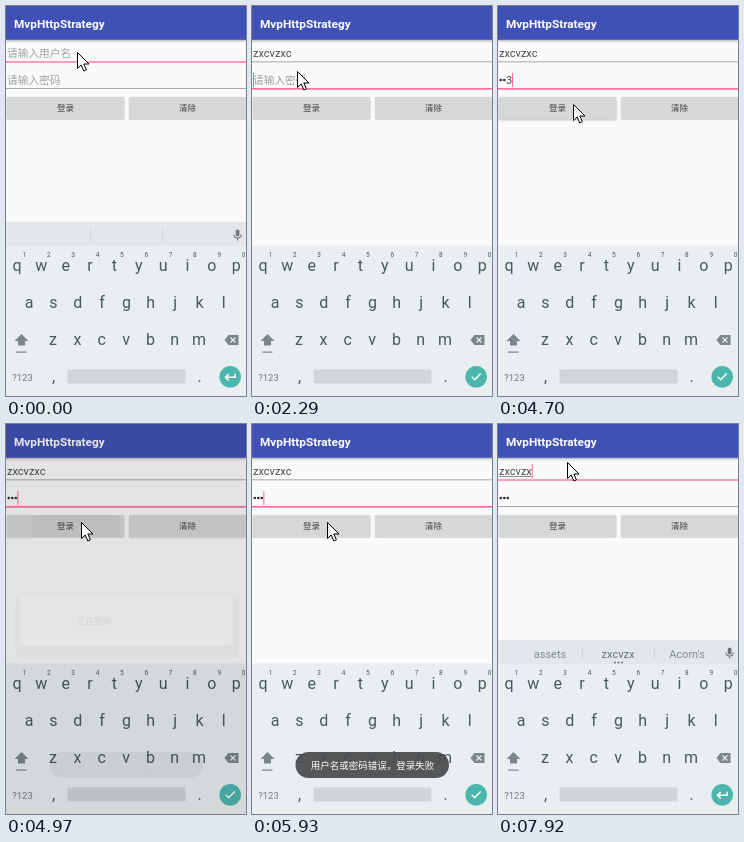
An HTML page with a canvas that plays this animation: 240 px wide and 390 px high, repeating every 8000 ms.

```html
<!DOCTYPE html>
<html lang="zh-CN">
<head>
<meta charset="utf-8">
<title>Login demo</title>
<style>
html, body { margin: 0; width: 100%; height: 100%; overflow: hidden; background: #fafafa; }
canvas { display: block; width: 240px; height: 390px; }
</style>
</head>
<body>
<canvas id="stage"></canvas>
<script>
const canvas = document.getElementById('stage');
const ctx = canvas.getContext('2d');
const ratio = window.devicePixelRatio || 1;
canvas.width = 240 * ratio;
canvas.height = 390 * ratio;

const LOOP = 8000;
const PINK = '#ff4081', TEAL = '#4db6ac', INK = '#475860', GREY = '#727b80';
const FONT = 'Roboto, "Noto Sans CJK SC", "Noto Sans CJK", sans-serif';
const USER = 'zxcvzxc';

const bursts = [
  [0, 0, 1], [310, 1050, 6], [1480, 2290, 7], [2720, 2720, 1], [3150, 3300, 2], [3610, 3610, 1],
  [4040, 4700, 6], [4970, 5500, 5], [5930, 6900, 8], [7050, 7500, 4], [7780, 7920, 2]
];
const ticks = bursts.flatMap(([a, b, n]) =>
  Array.from({ length: n }, (_, i) => n > 1 ? a + (b - a) * i / (n - 1) : a));

const progress = (t, a, b) => Math.min(1, Math.max(0, (t - a) / (b - a)));
const within = (t, a, b) => t >= a && t < b;

function text(s, x, y, size, color, align = 'left', weight = 400) {
  ctx.font = `${weight} ${size}px ${FONT}`;
  ctx.textAlign = align;
  ctx.fillStyle = color;
  ctx.fillText(s, x, y);
}
function rect(x, y, w, h, color, r = 0) {
  ctx.fillStyle = color;
  ctx.beginPath();
  ctx.roundRect(x, y, w, h, r);
  ctx.fill();
}
function circle(x, y, r, color) {
  ctx.fillStyle = color;
  ctx.beginPath();
  ctx.arc(x, y, r, 0, 7);
  ctx.fill();
}
function shape(d, x, y, fill, stroke, width = 1) {
  const path = new Path2D(d);
  ctx.save();
  ctx.translate(x, y);
  if (fill) { ctx.fillStyle = fill; ctx.fill(path); }
  if (stroke) { ctx.strokeStyle = stroke; ctx.lineWidth = width; ctx.stroke(path); }
  ctx.restore();
}
function shadowed(blur, dy, alpha, draw) {
  ctx.save();
  ctx.shadowColor = `rgba(0,0,0,${alpha})`;
  ctx.shadowBlur = blur * ratio;
  ctx.shadowOffsetY = dy * ratio;
  draw();
  ctx.restore();
}

function userLength(t) {
  if (t < 300) return 0;
  if (t < 1040) return 1 + Math.floor((t - 300) / 148);
  return t < 7770 ? 7 : 6;
}
const passLength = t => t < 3140 ? 0 : t < 3290 ? 1 : t < 3600 ? 2 : 3;
const userFocused = t => t < 2010 || t >= 6600;
const caretVisible = t => t >= 300 && ![
  [1470, 2010], [2710, 3140], [4160, 4560], [5490, 5920], [7490, 7770]
].some(([a, b]) => within(t, a, b));

function pointer(t) {
  const moves = [[1350, 2020, 45, 65], [3910, 4570, 75, 98], [5930, 6490, 69, 38]];
  let x = 71, y = 46;
  for (const [a, b, toX, toY] of moves) {
    const p = progress(t, a, b), k = p * p * (3 - 2 * p);
    x += (toX - x) * k;
    y += (toY - y) * k;
  }
  return [x, y];
}

function underline(y, focused) {
  if (focused) rect(0, y, 240, 1.1, PINK);
  else rect(0, y, 240, 0.8, '#8c8c8c');
}

function drawFields(t) {
  const focus = userFocused(t);
  const name = USER.slice(0, userLength(t));
  const count = passLength(t);
  let nameEnd = 1, passEnd = 1;

  if (name) {
    text(name, 1, 51, 11, '#4a4a4a');
    nameEnd += ctx.measureText(name).width;
    if (focus) rect(1, 52, nameEnd - 1, 0.8, '#666');
  } else text('请输入用户名', 1, 51, 10.7, '#a0a0a0');

  if (count) {
    const revealed = t < 4960;
    const dots = revealed ? count - 1 : count;
    for (let i = 0; i < dots; i++) circle(2.8 + i * 3.5, 74, 1.35, '#333');
    passEnd += dots * 3.5;
    if (revealed) {
      text(String(count), passEnd, 78, 11, '#4a4a4a');
      passEnd += 6.2;
    }
  } else text('请输入密码', 1, 78, 10.7, '#a0a0a0');

  underline(55.4, focus);
  underline(82.3, !focus);
  if (caretVisible(t)) {
    if (focus) rect(nameEnd, 40, 0.8, 14, PINK);
    else rect(passEnd, 67, 0.8, 14, PINK);
  }
  if (within(t, 6600, 7770)) {
    circle(39.5, 62, 6.2, PINK);
    shape('M0 0L4.5 3.5H-4.5Z', 39.5, 55.5, PINK);
  }
}

function drawButtons(t) {
  const raised = within(t, 4560, 4960);
  shadowed(raised ? 3 : 1.2, raised ? 1 : 0.5, 0.25, () => rect(0.8, 91, 117.4, 22, '#d6d7d7', 1.2));
  shadowed(1.2, 0.5, 0.25, () => rect(123, 91, 117, 22, '#d6d7d7', 1.2));
  if (within(t, 4960, 5220)) rect(26.5, 91, 87, 22, 'rgba(0,0,0,.03)', 1);
  text('登录', 59.5, 105, 8.5, '#404040', 'center');
  text('清除', 181.5, 105, 8.5, '#404040', 'center');
}

function drawSuggestions(t) {
  rect(0, 216, 240, 24, '#e2e7e9');
  rect(84, 222, 0.7, 14, '#cbd1d4');
  rect(156, 222, 0.7, 14, '#cbd1d4');
  rect(229.8, 223.5, 3.6, 7, '#6b7478', 1.8);
  shape('M-3.5 0A3.5 3.5 0 0 0 3.5 0M0 3.5V6', 231.6, 228.5, null, '#6b7478', 1.1);
  const n = t > 7000 && t < 7910 ? 7 : userLength(t);
  if (!n || within(t, 6600, 6750)) return;
  const words = n === 7 ? ['assured', 'as draws']
    : n === 6 ? ['assets', "Acorn's"] : n > 2 ? ['adds', 'as of'] : ['as', 'and'];
  text(words[0], 52, 233.5, 11, '#7f8c93', 'center');
  text(USER.slice(0, n), 120, 233.5, 11, '#64737a', 'center');
  text(words[1], 189, 233.5, 11, '#7f8c93', 'center');
  for (let i = -1; i < 2; i++) circle(120.5 + i * 3.5, 238.5, 0.9, '#56656c');
}

function drawKeyboard(t) {
  const focus = userFocused(t);
  shadowed(2, 0, focus ? 0 : 0.1, () => rect(0, 240, 240, 150, '#e9eef1'));
  if (focus) drawSuggestions(t);

  [['qwertyuiop', 11, 265], ['asdfghjkl', 23, 302], ['zxcvbnm', 47, 339.4]].forEach(([keys, x, y]) =>
    [...keys].forEach((key, i) => text(key, x + i * 24.35, y, 16, INK, 'center')));
  [...'1234567890'].forEach((digit, i) => text(digit, 18.5 + i * 24.35, 251, 6.5, INK, 'center'));

  shape('M0 -6L7 1H3.5V5.5H-3.5V1H-7Z', 15.5, 334, '#7b858a');
  rect(10, 345.5, 10.5, 1.2, '#7b858a');
  shape('M-7 0L-3 -5H7V5H-3Z', 225.5, 334, '#7b858a');
  shape('M-1 -2.5L4 2.5M4 -2.5L-1 2.5', 225.5, 334, null, '#e9eef1', 1.2);

  text('?123', 16.5, 374.5, 9.5, GREY, 'center');
  text(',', 47.5, 375.5, 16, INK, 'center');
  rect(61.5, 363.5, 118, 14, '#cfd5d8', 1.5);
  text('.', 193.5, 375.5, 16, INK, 'center');
  circle(224.2, 370.8, 10.8, TEAL);
  const icon = focus ? 'M5 -3V0.5H-4.5M-1.5 -2.7L-4.7 0.5L-1.5 3.7' : 'M-4.5 0L-1.5 3L4.5 -3.2';
  shape(icon, 224.2, 370.8, null, '#fff', 1.5);
}

function drawDialog(t) {
  if (!within(t, 4960, 5230)) return;
  const fade = 1 - progress(t, 4970, 5225);
  rect(0, 0, 240, 390, `rgba(0,0,0,${0.095 * fade})`);
  ctx.globalAlpha = fade * fade;
  rect(9, 170, 224, 65, 'rgba(0,0,0,.025)', 10);
  rect(14, 171, 213, 50, 'rgba(255,255,255,.22)', 2);
  text('正在登录', 71, 199.5, 8.5, 'rgba(90,90,90,.13)');
  ctx.globalAlpha = 1;
}

function drawToast(t) {
  const alpha = progress(t, 4930, 5450) * (1 - progress(t, 6900, 7500));
  if (!alpha) return;
  ctx.globalAlpha = alpha;
  rect(43.5, 328, 153.5, 26, 'rgba(75,77,79,.94)', 13);
  text('用户名或密码错误，登录失败', 120.5, 344.8, 9.5, '#fff', 'center');
  ctx.globalAlpha = 1;
}

function draw(t) {
  ctx.setTransform(ratio, 0, 0, ratio, 0, 0);
  rect(0, 0, 240, 390, '#fafafa');
  shadowed(2.5, 0.8, 0.32, () => rect(0, 0, 240, 33.8, '#3f51b5'));
  text('MvpHttpStrategy', 8, 22, 11.8, '#fff', 'left', 700);
  drawFields(t);
  drawButtons(t);
  drawKeyboard(t);
  drawDialog(t);
  drawToast(t);
  const [x, y] = pointer(t);
  shape('M.5 .5V16.5L4.2 13L6.8 19L9.4 17.8L6.8 12H12Z', x, y, '#fff', '#000', 1);
}

const start = performance.now();
function frame() {
  const time = (performance.now() - start) % LOOP;
  draw(ticks.findLast(tick => tick <= time) ?? 0);
  requestAnimationFrame(frame);
}
frame();
</script>
</body>
</html>
```
